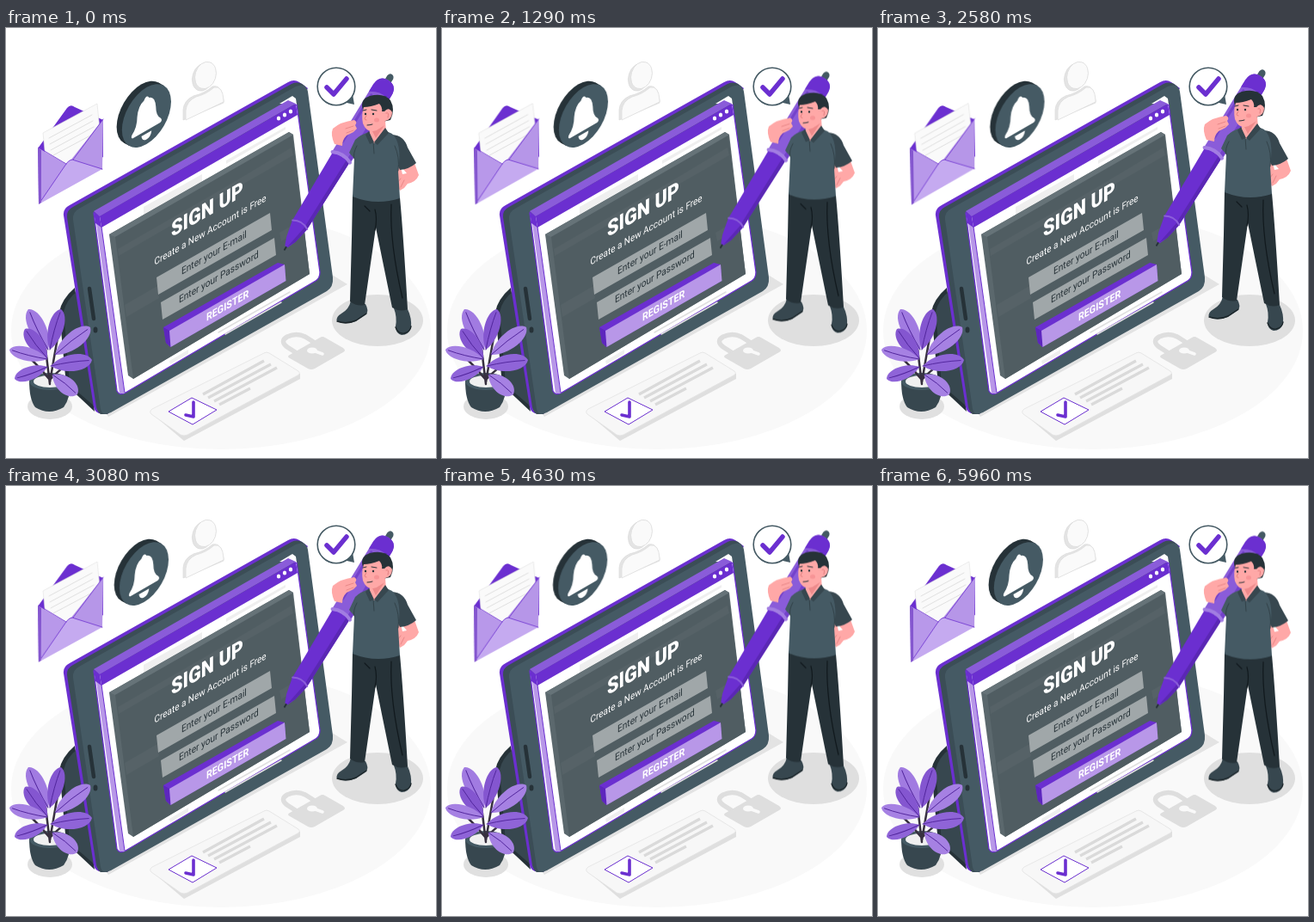
An HTML page that plays this animation: 500 px wide and 500 px high, repeating every 6 s.

```html
<!DOCTYPE html>
<html lang="en">
<head>
<meta charset="utf-8">
<title>Sign up</title>
<style>
html, body { margin: 0; width: 100%; height: 100%; overflow: hidden; background: #fff; }
svg { display: block; width: 100vw; height: 100vh; }
text { font-family: Roboto, Inter, sans-serif; }
.float { animation: float 1.5s linear infinite; }
.sway { animation: sway 1.5s linear infinite; transform-box: fill-box; transform-origin: center; }
.shake { animation: shake 6s linear infinite; }
@keyframes float { 50% { transform: translateY(-9px); } }
@keyframes sway { 25% { transform: rotate(1deg); } 75% { transform: rotate(-1deg); } }
@keyframes shake {
  10%, 90% { transform: translateX(-1px); }
  20%, 80% { transform: translateX(2px); }
  30%, 50%, 70% { transform: translateX(-4px); }
  40%, 60% { transform: translateX(4px); }
}
.slate { fill: #455a64; }
.deep { fill: #37474f; }
.ink { fill: #263238; }
.violet { fill: #6b2fd0; }
.mid { fill: #8a5cd9; }
.lilac { fill: #b897e8; }
.skin { fill: #ffa8a7; }
.line { fill: none; stroke-linecap: round; stroke-linejoin: round; }
</style>
</head>
<body>
<svg viewBox="0 0 500 500">
  <ellipse cx="250" cy="352" rx="244" ry="138" fill="#f9f9f9"/>
  <path d="M110 440L119 452 397 298 376 285Z" fill="#e3e3e3"/>
  <ellipse cx="432" cy="340" rx="53" ry="30" fill="#dfdfdf"/>
  <ellipse cx="51" cy="440" rx="26" ry="15" fill="#e0e0e0"/>

  <!-- checklist card -->
  <path d="M168 447L207 480 342 408V402L303 383Z" fill="#dfdfdf"/>
  <path d="M170 443L300 378Q303 376 306 378L340 399Q343 402 339 404L211 473Q207 475 203 473L169 449Q166 446 170 443Z" fill="#f7f7f7" stroke="#e3e3e3" stroke-width=".8"/>
  <path d="M189 446L216 430 245 444 217 461Z" fill="#fff" stroke="#6b2fd0" stroke-width="1"/>
  <path class="line" d="M209 450L218 452 218 435" stroke="#6b2fd0" stroke-width="3.6"/>
  <path class="line" d="M229 426L300 387M235 430L308 391M242 434L315 395M248 438L284 419" stroke="#dadada" stroke-width="3.2" style="stroke-linecap:butt"/>

  <!-- padlock -->
  <path class="line" d="M338 378L327 371Q318 364 327 359 338 354 348 359L359 366" stroke="#dedede" stroke-width="5.5"/>
  <path d="M330 380L365 360Q368 358 371 360L392 372Q396 375 392 377L359 396Q355 398 351 396L330 384Q326 382 330 380Z" fill="#dedede"/>
  <ellipse cx="356" cy="375" rx="6" ry="3.6" fill="#f9f9f9"/>
  <path class="line" d="M357 375L368 379" stroke="#f9f9f9" stroke-width="3.6"/>

  <!-- profile icon -->
  <g stroke="#dedede" stroke-width=".8">
    <path d="M206 107V95Q207 84 218 79 231 76 240 68 248 66 251 75L253 84V87Z" fill="#e4e4e4"/>
    <path d="M209 107V96Q210 85 221 80 233 77 242 69 252 67 253 84V86Z" fill="#fafafa"/>
    <ellipse cx="229" cy="57" rx="12" ry="16.5" transform="rotate(18 229 57)" fill="#e4e4e4"/>
    <ellipse cx="232" cy="55" rx="12" ry="16" transform="rotate(18 232 55)" fill="#fafafa"/>
  </g>

  <!-- bell badge -->
  <g class="shake">
    <circle class="ink" r="33" transform="matrix(.866 -.5 0 1 157.200 98.600)"/>
    <path class="ink" d="M177.400 63.600L183.600 67.100 143.200 137.100 137 133.600Z"/>
    <g transform="matrix(.866 -.5 0 1 163.400 102.100)">
      <circle class="slate" r="33"/>
      <path transform="scale(1.140)" d="M-16 15Q-19 14-17 11-11 6-11-4-10-15-3-17 0-22 3-17 10-15 11-4 11 6 17 11 19 14 16 15ZM-6 18H6Q5 24 0 24-5 24-6 18Z" fill="#fff"/>
    </g>
  </g>

  <!-- envelope -->
  <g class="sway">
    <path class="violet" d="M37 140L71 93Q75 88 80 92L113 107V150L60 175Z"/>
    <path d="M43 122L106 88 109 118 75 160 46 152Z" fill="#fafafa" stroke="#e0e0e0" stroke-width=".6"/>
    <path class="line" d="M50 128L100 101M51 135L101 108M52 142L102 115M55 148L100 124" stroke="#d8d8d8" stroke-width=".8"/>
    <path d="M37 139L73 160 38 205Z" fill="#b898ea"/>
    <path d="M113 106L75 154 112 165Z" fill="#b696e8"/>
    <path d="M38 205L70 158Q75 151 80 154L112 164Z" fill="#c5aaf0"/>
    <path class="line" d="M38 139L70 158M40 202L70 158Q75 151 80 154L112 164M113 106L78 153" stroke="#6b2fd0" stroke-width=".8"/>
    <path d="M37 139L41 142 41 203 38 205Z" fill="#8456cf"/>
  </g>

  <!-- tablet -->
  <path class="ink" d="M80 302Q65 315 62 330L70 415 103 446Z"/>
  <path class="deep" d="M84 305Q70 316 67 330L74 415 103 440Z"/>
  <path class="violet" d="M67 218Q66 210 74 206L328 63Q335 59 341 63L351 70 118 449 108 448Q103 446 102 441Z"/>
  <path d="M71 220Q70 212 78 208L332 65Q341 61 348 68L118 449 110 449Q106 446 105 441Z" fill="#3b4d56"/>
  <path class="slate" d="M78 223Q77 214 85 210L337 68Q349 63 351 74L380 290Q381 301 373 306L122 447Q112 452 110 443Z"/>
  <path class="line" d="M97 303L102 338" stroke="#263238" stroke-width="4.500"/>
  <ellipse class="ink" cx="104" cy="351" rx="2.500" ry="3.500"/>

  <!-- window -->
  <path d="M102 215L110 219 338 89 365 284Q365 291 360 294L139 424Q132 428 129 422Z" fill="#fff" stroke="#6b2fd0" stroke-width="1.300" stroke-linejoin="round"/>
  <path d="M318 88L333 79 337 82 338 89Z" fill="#fff"/>
  <path class="lilac" d="M105 227L111 231 138 425 132 425Z"/>
  <path class="line" d="M111 231L138 424" stroke="#6b2fd0" stroke-width="1"/>
  <path d="M256 158L325 118V115L256 154ZM160 208L228 170V180L160 218Z" fill="#efefef"/>
  <path d="M190 387L212 374V379L191 391Z" fill="#efefef"/>
  <path class="line" d="M247 354L330 307M255 356L320 319" stroke="#e0e0e0" stroke-width="1.500"/>
  <path class="violet" d="M102 213L109 219 111 232 104 227Z"/>
  <path class="mid" d="M102 213L328 84 337 88 109 219Z"/>
  <path class="violet" d="M109 219L337 88 339 101 111 232Z"/>
  <g fill="#fff">
    <ellipse cx="317" cy="105" rx="2.200" ry="2.600"/>
    <ellipse cx="324" cy="101" rx="2.200" ry="2.600"/>
    <ellipse cx="331" cy="97" rx="2.200" ry="2.600"/>
  </g>

  <!-- form -->
  <path d="M120 240L329 121 334 124 353 286 148 408 142 404Z" fill="#5b686d"/>
  <path d="M120 240L329 121 334 124 127 243Z" fill="#667378"/>
  <path d="M127 243L333 125 353 286 148 408Z" fill="#505d62"/>
  <path d="M130 257L250 188 332 139 334 148 200 225 131 265ZM138 322L176 300 178 314 140 336ZM318 238L346 222 347 232 320 248Z" fill="#fff" opacity=".03"/>
  <path d="M175 290L307 215 309 235 177 310ZM180 319L312 244 314 264 182 339Z" fill="#a0a7a9"/>
  <path class="violet" d="M183 348L316 273 324 275 325 294 191 371 186 366Z"/>
  <path d="M183 348L190 352 191.500 371 186 366Z" fill="#5d26bd"/>
  <path class="lilac" d="M190 352L324 275 325.500 294 191.500 371Z"/>
  <g class="ink">
    <text transform="matrix(.866 -.5 0 1 192 243.500)" font-size="25" font-weight="900" fill="#fff">SIGN UP</text>
    <text transform="matrix(.866 -.5 0 1 172.500 276)" font-size="11.500" fill="#fff">Create a New Account is Free</text>
    <text transform="matrix(.866 -.5 0 1 204 287)" font-size="11.700">Enter your E-mail</text>
    <text transform="matrix(.866 -.5 0 1 201 320)" font-size="11.700">Enter your Password</text>
    <text transform="matrix(.866 -.5 0 1 233 341)" font-size="12.400" font-weight="700" fill="#fff">REGISTER</text>
  </g>

  <!-- speech bubble -->
  <path class="slate" d="M392 86L405 89 403 77Z"/>
  <circle cx="384" cy="68" r="21.800" fill="#fff" stroke="#455a64" stroke-width="1.600"/>
  <path class="line" d="M373 69L381 77 396 59" stroke="#6b2fd0" stroke-width="5.500"/>

  <g class="float">
    <!-- pen -->
    <g transform="translate(325 256) rotate(-58.500)">
      <path class="line" d="M-2 0L5 0" stroke="#263238" stroke-width="2"/>
      <path class="slate" d="M224-4H233Q237-3 237 0T233 4H224Z"/>
      <path class="violet" d="M2-2L12-6 31-10 125-11.500V11.500L31 10 12 6 2 2Z"/>
      <path d="M2 1L31 6 125 7V11.500L31 10 12 6Z" fill="#5a27b4"/>
      <path class="line" d="M32-10Q38 0 32 10" stroke="#8c5fda" stroke-width="2"/>
      <path class="mid" d="M122-12.500H216Q229-12 229 0T216 12.500H122Q128 0 122-12.500Z"/>
      <path class="violet" d="M206-12.500H216Q229-12 229 0T216 12.500H190V7H210Q214 0 206-12.500Z"/>
      <path d="M124 7H190V12.500H122Z" fill="#7442cb"/>
      <path class="line" d="M124-12Q130 0 124 12" stroke="#a27de2" stroke-width="4"/>
      <path class="line" d="M140-8L204-8" stroke="#7442cb" stroke-width="3"/>
    </g>

    <!-- shoes and trousers -->
    <path class="deep" d="M401 317L418 321Q422 328 419 333L407 341Q394 346 385 341 383 336 390 332 399 327 401 317Z"/>
    <path class="deep" d="M451 326L467 327Q472 337 471 349 468 357 460 357 453 355 453 347 455 336 451 326Z"/>
    <path class="line" d="M385 341Q396 345 407 340L419 332M453 348Q456 356 463 355 470 353 471 347" stroke="#1b2529" stroke-width="1.400"/>
    <path class="ink" d="M403 194L458 197Q462 240 467 327 458 331 449 325L430 232 417 322Q408 324 400 318L402 245Z"/>
    <path class="line" d="M429 211Q432 222 429 235M448 205Q446 250 461 314M417 207L423 213" stroke="#11191d" stroke-width="1.200"/>

    <!-- right arm -->
    <path class="skin" d="M461 163L475 157 480 171Q477 179 467 181L463 186 458 189 456 185 448 188 446 186 450 180 445 179 446 176 453 172 456 162 459 162 461 170 466 169Z"/>
    <path class="line" d="M459 175L453 183M463 177L459 185" stroke="#e37f80" stroke-width=".8"/>
    <path class="deep" d="M449 124Q463 125 467 139L477 157Q469 164 458 165L450 148Z"/>

    <!-- torso -->
    <path class="slate" d="M422 121Q412 124 406 130L399 145 405 152 403 196Q430 207 458 198L456 166Q461 134 449 123L438 118Z"/>
    <path class="line" d="M452 137Q458 150 456 166M408 137Q403 146 405 152M427 132L428 146" stroke="#33434a" stroke-width="1"/>
    <path class="skin" d="M424 114L441 107 442 122 428 134 422 126Z"/>
    <path d="M425 118Q433 119 440 113L430 128Z" fill="#ee8b8c"/>
    <path class="deep" d="M422 120L428 133 423 135 418 124ZM441 116L445 122 432 136 428 133Z"/>

    <!-- head -->
    <path class="ink" d="M415 95Q411 83 423 79 439 75 447 84 453 95 447 107L438 109Z"/>
    <path class="skin" d="M416 92Q413 101 415 111 419 121 427 120 437 118 441 108 449 106 449 98 445 91 440 97L437 97Q438 92 434 88 424 92 416 92Z"/>
    <path class="line" d="M442 99Q446 97 444 104M419 102Q415 107 419 107" stroke="#e37f80" stroke-width="1"/>
    <path class="line" d="M415 96L419 95M425 95L431 96M420 113Q423 113 426 112" stroke="#263238" stroke-width="1"/>
    <circle class="ink" cx="418" cy="100" r="1.200"/>
    <circle class="ink" cx="427" cy="100" r="1.200"/>
    <ellipse cx="431" cy="107" rx="3" ry="2.500" fill="#f79496"/>

    <!-- hand on pen -->
    <path class="skin" d="M405 107Q409 109 406 113L408 117 404 121 396 125Q391 130 391 137L382 135Q377 124 380 117 389 109 405 107Z"/>
    <path class="line" d="M404 114L395 117M404 119L396 122" stroke="#e37f80" stroke-width=".8"/>
  </g>

  <!-- plant -->
  <path class="deep" d="M27 410Q27 432 34 441 50 451 67 441 75 431 75 410Z"/>
  <ellipse class="slate" cx="51" cy="411" rx="24" ry="10"/>
  <ellipse cx="51" cy="411" rx="19" ry="7" fill="#f0f0f0"/>
  <path class="line" d="M51 414Q48 390 45 365M51 412Q55 388 60 360M50 408Q40 395 28 384M52 408Q62 397 74 390" stroke="#37303f" stroke-width="2.500"/>
  <g id="leaves"></g>
</svg>
<script>
// Base point, tip, half width, fill
const leaves = [
  [49, 374, 26, 327, 10, "#a17be1"],
  [51, 374, 64, 327, 9, "#8456d0"],
  [48, 384, 22, 350, 9, "#8456d0"],
  [57, 380, 98, 348, 10, "#a681e3"],
  [48, 385, 4, 374, 8, "#a681e3"],
  [48, 394, 10, 408, 8, "#8f64d8"],
  [52, 393, 100, 386, 10, "#8f64d8"],
  [54, 403, 83, 426, 10, "#a681e3"]
];

function leafMarkup([x, y, tipX, tipY, w, fill]) {
  const length = Math.hypot(tipX - x, tipY - y);
  const angle = Math.atan2(tipY - y, tipX - x) * 180 / Math.PI;
  const a = length * .3, b = length * .9;
  return `<g transform="translate(${x} ${y}) rotate(${angle})">
    <path d="M0 0C${a} ${-w * 1.3} ${b} ${-w * 1.3} ${length} 0C${b} ${w * 1.3} ${a} ${w * 1.3} 0 0Z" fill="${fill}"/>
    <path class="line" d="M0 0Q${length / 2} -2 ${length * .92} 0" stroke="#51259c" stroke-width=".9"/></g>`;
}

document.getElementById("leaves").innerHTML = leaves.map(leafMarkup).join("");
</script>
</body>
</html>
```
